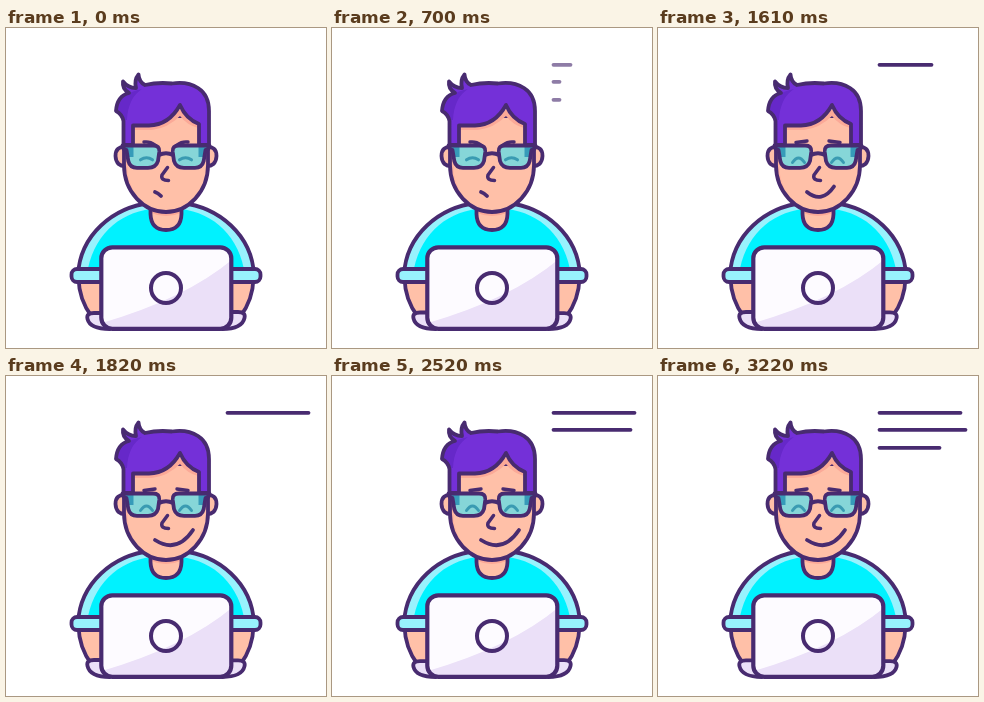
Write an HTML page with a canvas that moves like this. It is 320x320 px and loops after 3500 ms.

```html
<!DOCTYPE html>
<html lang="en">
<head>
<meta charset="utf-8">
<title>Typing at a laptop</title>
<style>
html, body { margin: 0; width: 100%; height: 100%; overflow: hidden; background: #fff; }
canvas { display: block; width: 320px; height: 320px; }
</style>
</head>
<body>
<canvas id="stage" width="320" height="320"></canvas>
<script>
const ctx = document.getElementById('stage').getContext('2d');
const LOOP = 3500, STEP = 70, LAST = 3220, LINE = 3.8;
const INK = '#482b70', SKIN = '#ffc0a8', SHADE = '#fba997';
const CYAN = '#00f2ff', PALE = '#98f2fd', HAIR = '#7430d8', LILAC = '#ebe0f8';

ctx.lineCap = ctx.lineJoin = 'round';

// Fill and/or stroke an SVG path string or a Path2D.
function draw(shape, fill, width, color = INK) {
  const p = typeof shape === 'string' ? new Path2D(shape) : shape;
  if (fill) { ctx.fillStyle = fill; ctx.fill(p); }
  if (width) { ctx.lineWidth = width; ctx.strokeStyle = color; ctx.stroke(p); }
}

function box(x, y, w, h, r) {
  const p = new Path2D();
  p.roundRect(x, y, w, h, r);
  return p;
}

function clipped(shape, paint) {
  ctx.save();
  ctx.clip(typeof shape === 'string' ? new Path2D(shape) : shape);
  paint();
  ctx.restore();
}

// Paint once, then again mirrored around the middle of the figure.
function mirrored(paint) {
  paint(1);
  ctx.save();
  ctx.translate(320, 0);
  ctx.scale(-1, 1);
  paint(-1);
  ctx.restore();
}

// Piecewise linear value from [time, value] pairs.
function track(t, keys) {
  if (t <= keys[0][0]) return keys[0][1];
  for (let i = 1; i < keys.length; i++) {
    const [a, u] = keys[i - 1], [b, v] = keys[i];
    if (t <= b) return u + (v - u) * (t - a) / (b - a);
  }
  return keys[keys.length - 1][1];
}

const mix = (a, b, k) => a + (b - a) * k;

function body(t) {
  mirrored(side => {
    draw('M72.5 250Q73 272 86 289H104V250Z', SKIN, LINE);
    const y = 284.5 + Math.sin(t / 70 * 2.1 + side) * 0.6;
    draw(`M100 ${y}H88Q80 ${y} 81.5 ${y + 6}Q84 301 104 301V${y}Z`, LILAC, LINE);
  });
  const shirt = 'M145 175C107 179 74 207 72 247H248C246 207 213 179 175 175Z';
  draw(shirt, CYAN);
  clipped(shirt, () => mirrored(() =>
    draw('M145 170V181C112 185 86 209 81 247H66V170Z', PALE)));
  draw(shirt, null, LINE);
  mirrored(() => draw(box(65.5, 241, 40, 13, 5.5), PALE, LINE));
  const neck = 'M144.5 172V186Q145 202 160 202Q175 202 175.5 186V172';
  draw(neck, SKIN);
  clipped(neck, () => draw('M143 174H177V184Q160 192 143 184Z', SHADE));
  draw(neck, null, LINE);
}

function laptop() {
  const lid = box(95.3, 219.3, 130, 81.5, 11);
  draw(lid, '#fdfbff');
  clipped(lid, () => draw('M228 230Q180 271 92 296V304H228Z', LILAC));
  draw(lid, null, 4.2);
  draw('M175 260A15 15 0 1 1 145 260A15 15 0 1 1 175 260Z', null, 4);
}

function head() {
  mirrored(() => draw('M120 119Q109.5 118 109.5 128Q110 139 121 138Z', SKIN, LINE));
  const face = 'M118 88V137C118 164 138 184 160 184C182 184 202 164 202 137V88Z';
  draw(face, SKIN);
  clipped(face, () => draw('M116 88H127V118Q121 122 122 146Q126 168 143 181L116 180Z', '#ffb5a0'));
  draw(face, null, LINE);
  draw('M128 98H146Q162 95 174 81Q181 91 192 96V100Q181 97 174 88Q162 100 146 102H128Z', SHADE);
  const hair = 'M117.5 117V93Q116 86 110 83Q111 68 123 65Q116 61 117 53.5' +
    'Q122 60 130 60Q128 52 132.5 46.5Q133 54 139 57Q152 54 166 55.5' +
    'Q181 53 192 60Q203 67 203 83V117H193V96Q180 91 174 77Q163 97 143 97.5H127V117Z';
  draw(hair, HAIR);
  clipped(hair, () => draw('M109 84Q112 66 136 61Q122 70 121 92H115Z', '#6628c9'));
  draw(hair, null, LINE);
}

function glasses(mood) {
  mirrored(() => {
    const lens = 'M116.5 117.5H147Q154 117.5 153.3 124L152 133Q150 139.8 142 139.8' +
      'H131Q124 139.8 122.3 133L120.5 122Q116.5 122 116.5 117.5Z';
    draw(lens, '#86d6d8');
    clipped(lens, () => {
      draw('M116 117H127.5V129H116Z', '#369bb9');
    });
    // Eyes open from a flat squint into round arcs.
    const y = mix(131.8, 134.5, mood), rise = mix(4, 9, mood);
    draw(`M134.5 ${y}Q140.5 ${y - rise} 146.5 ${y}`, null, 3, '#3a9bb2');
    draw(lens, null, LINE);
  });
  draw('M153 127Q160 123.5 167 127', null, LINE);
}

function expression(mood, grin) {
  mirrored(() => {
    const outer = mix(114, 114.5, mood), inner = mix(117, 113, mood);
    draw(`M138 ${outer}Q144 ${outer - 0.8} 149 ${inner}`, null, 3.4);
  });
  draw('M161.5 139.5L156 147Q154.5 152.5 162.5 152.5', null, 3.5);
  const x = track(grin, [[0, 155], [1, 176], [2, 187]]);
  const y = track(grin, [[0, 168], [1, 158.5], [2, 154]]);
  const cx = track(grin, [[0, 152], [1, 164], [2, 171]]);
  const cy = track(grin, [[0, 165], [1, 176], [2, 178]]);
  draw(`M149 164Q${cx} ${cy} ${x} ${y}`, null, LINE);
}

function dash(y, len, alpha = 1) {
  if (len <= 0 || alpha <= 0) return;
  ctx.globalAlpha = alpha;
  draw(`M221.5 ${y}H${221.5 + Math.max(0.1, len - 3)}`, null, LINE);
  ctx.globalAlpha = 1;
}

function lines(t) {
  const fade = track(t, [[560, 1], [700, 0.62], [910, 0]]);
  dash(36.8, track(t, [[70, 0], [280, 20]]), fade);
  dash(53.8, track(t, [[210, 0], [350, 9]]), fade);
  dash(71.8, track(t, [[350, 0], [490, 9]]), fade);

  dash(36.8, track(t, [[1190, 0], [1330, 20], [1540, 38], [1610, 55], [1680, 74], [1750, 84]]));
  dash(53.8, track(t, [[2030, 0], [2100, 15], [2520, 80], [2590, 89]]));
  dash(71.8, track(t, [[2660, 0], [3080, 63]]));
}

function frame(now) {
  const t = Math.min(Math.floor((now % LOOP) / STEP) * STEP, LAST);
  const mood = track(t, [[1400, 0], [1610, 1]]);
  const grin = track(t, [[1400, 0], [1610, 1], [1820, 2]]);
  ctx.fillStyle = '#fff';
  ctx.fillRect(0, 0, 320, 320);
  body(t);
  laptop();
  head();
  glasses(mood);
  expression(mood, grin);
  lines(t);
}

const start = performance.now();
function tick() {
  frame(performance.now() - start);
  requestAnimationFrame(tick);
}
tick();
</script>
</body>
</html>
```
